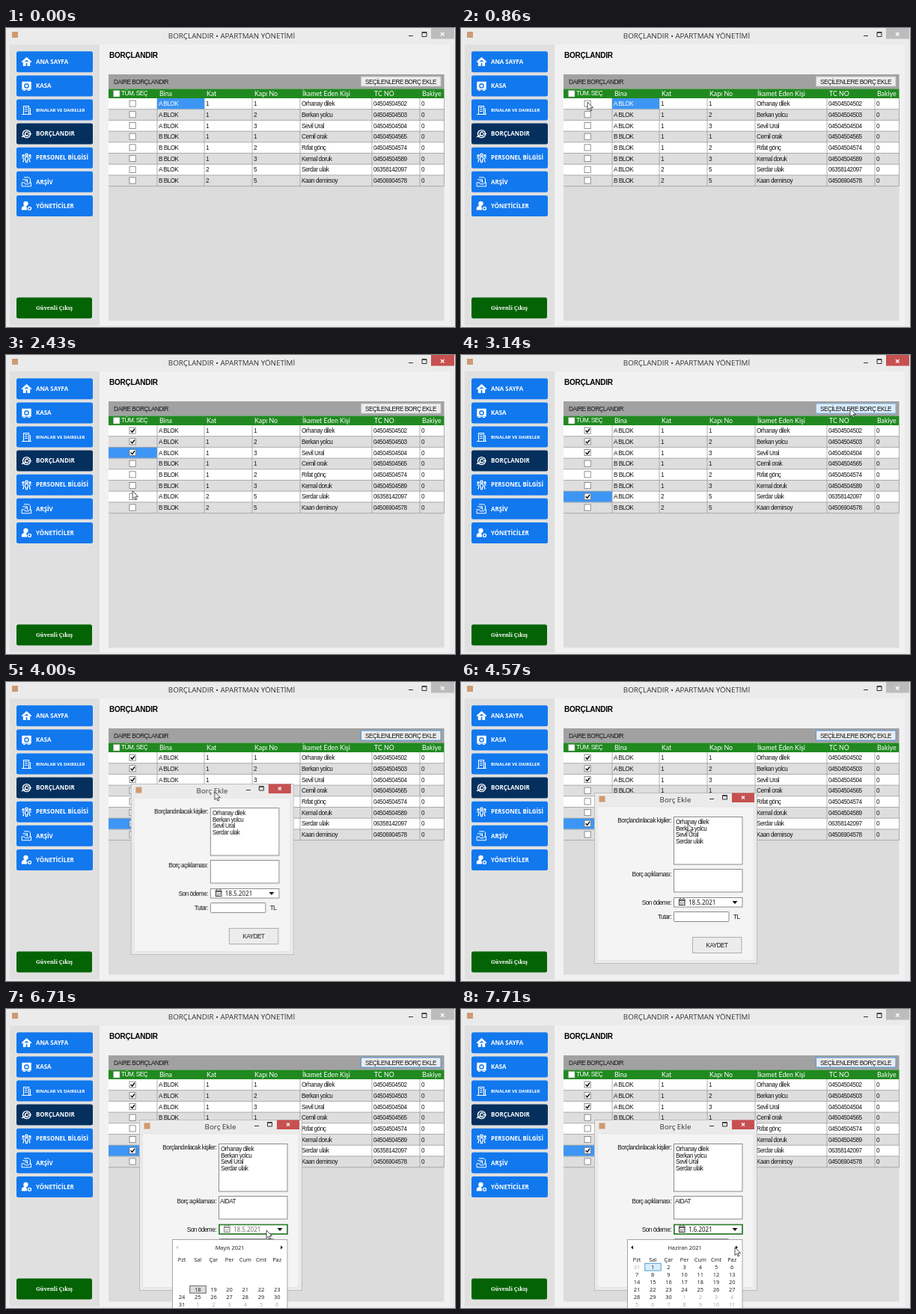
Animation, 600 px wide and 400 px high, one loop 8000 ms. Source, as an HTML page:

```html
<!DOCTYPE html>
<html lang="tr">
<head>
<meta charset="utf-8">
<title>Borçlandır</title>
<style>
html, body { margin: 0; width: 100%; height: 100%; overflow: hidden; background: #ebebeb; }
svg { display: block; width: 600px; height: 400px; }
text { font: 8.2px "Liberation Sans", Arial, sans-serif; letter-spacing: -.5px; fill: #161616; white-space: pre; }
.title { font: 9.8px "Open Sans", sans-serif; letter-spacing: 0; fill: #333; text-anchor: middle; }
.big { font-weight: bold; font-size: 10px; letter-spacing: -.25px; fill: #000; }
.head { font: 8.8px Lato, sans-serif; letter-spacing: 0; fill: #fff; }
.all { fill: #fff; }
.nav { font: bold 7.9px "Open Sans", sans-serif; letter-spacing: 0; fill: #fff; }
.small { font-size: 6px; }
.exit { font: bold 7.3px "Noto Serif", serif; letter-spacing: 0; fill: #fff; text-anchor: middle; }
.date { font: 8px "Noto Sans", sans-serif; letter-spacing: 0; }
.cal { font: 7.4px "Open Sans", sans-serif; letter-spacing: 0; text-anchor: middle; }
.mid { text-anchor: middle; }
.end { text-anchor: end; }
.dim { fill: #aaa; }
.icon { fill: none; stroke: #fff; stroke-width: 1.4; stroke-linejoin: round; stroke-linecap: round; }
.box { fill: #fff; stroke: #8b8b8b; }
.btn { fill: #ececec; stroke: #adadad; }

/* 1% of the loop = 80 ms */
.a { animation: 8s step-end infinite; }
.smooth { animation-timing-function: ease-in-out; }
.firstCell { animation-name: firstCell; }
.active { animation-name: active; }
.sel { animation-name: sel; }
.tick0 { animation-name: tick0; }
.tick1 { animation-name: tick1; }
.tick2 { animation-name: tick2; }
.tick6 { animation-name: tick6; }
.hover { animation-name: hover; }
.dialog { animation-name: drag; }
.key1 { animation-name: key1; }
.key2 { animation-name: key2; }
.key3 { animation-name: key3; }
.key4 { animation-name: key4; }
.key5 { animation-name: key5; }
.caret { animation-name: caret; }
.open { animation-name: open; }
.may { animation-name: may; }
.mayDate { animation-name: mayDate; }
.june { animation-name: june; }
.pointer { animation-name: pointer; }

@keyframes firstCell { 0% { visibility: visible } 12.4%, to { visibility: hidden } }
@keyframes active { 0% { fill: #bcbcbc } 12.4% { fill: #c75050 } 41.1%, to { fill: #bcbcbc } }
@keyframes sel {
  0% { visibility: hidden }
  12.4% { visibility: visible; transform: translateY(0) }
  22.3% { visibility: visible; transform: translateY(14.7px) }
  26.8% { visibility: visible; transform: translateY(29.4px) }
  32.1%, to { visibility: visible; transform: translateY(88.2px) }
}
@keyframes tick0 { 0% { visibility: hidden } 12.4%, to { visibility: visible } }
@keyframes tick1 { 0% { visibility: hidden } 22.3%, to { visibility: visible } }
@keyframes tick2 { 0% { visibility: hidden } 26.8%, to { visibility: visible } }
@keyframes tick6 { 0% { visibility: hidden } 32.1%, to { visibility: visible } }
@keyframes hover {
  0% { fill: #ececec; stroke: #c4c4c4 }
  37.5% { fill: #dcecfa; stroke: #7eb4ea }
  41.1%, to { fill: #ececec; stroke: #4a9be6 }
}
@keyframes drag {
  0%, 41.1% { opacity: 0; transform: translate(-14px, -15px) }
  42.8%, 48.4% { opacity: 1; transform: translate(-14px, -15px) }
  53.6%, to { opacity: 1; transform: none }
}
@keyframes key1 { 0% { visibility: hidden } 66.1%, to { visibility: visible } }
@keyframes key2 { 0% { visibility: hidden } 67.8%, to { visibility: visible } }
@keyframes key3 { 0% { visibility: hidden } 69.6%, to { visibility: visible } }
@keyframes key4 { 0% { visibility: hidden } 73.2%, to { visibility: visible } }
@keyframes key5 { 0% { visibility: hidden } 75%, to { visibility: visible } }
@keyframes caret {
  0% { visibility: hidden }
  60.7% { visibility: visible; transform: none }
  66.1% { visibility: visible; transform: translateX(5px) }
  67.8% { visibility: visible; transform: translateX(6.8px) }
  69.6% { visibility: visible; transform: translateX(12.2px) }
  73.2% { visibility: visible; transform: translateX(17.2px) }
  75% { visibility: visible; transform: translateX(21.7px) }
  82.1%, to { visibility: hidden }
}
@keyframes open { 0% { visibility: hidden } 82.1%, to { visibility: visible } }
@keyframes may { 0% { visibility: hidden } 82.1% { visibility: visible } 92.8%, to { visibility: hidden } }
@keyframes mayDate { 0% { opacity: 1 } 82.1% { opacity: .6 } 92.8%, to { opacity: 0 } }
@keyframes june { 0% { visibility: hidden } 92.8%, to { visibility: visible } }
@keyframes pointer {
  0%, 1.7% { opacity: 0; transform: translate(300px, 260px) }
  1.8% { opacity: 1; transform: translate(300px, 260px) }
  10.7%, 16% { opacity: 1; transform: translate(169px, 99px) }
  20.5%, 22.8% { opacity: 1; transform: translate(170px, 112px) }
  25.9%, 27.3% { opacity: 1; transform: translate(170px, 128px) }
  31.2%, 32.6% { opacity: 1; transform: translate(169px, 187px) }
  38.4%, 41.1% { opacity: 1; transform: translate(520px, 72px) }
  47%, 48.4% { opacity: 1; transform: translate(276px, 144px) }
  53.6%, 55% { opacity: 1; transform: translate(290px, 159px) }
  60.7%, 63% { opacity: 1; transform: translate(335px, 264px) }
  63.1%, 76% { opacity: 0; transform: translate(335px, 264px) }
  76.1% { opacity: 1; transform: translate(335px, 264px) }
  81%, 84% { opacity: 1; transform: translate(348px, 296px) }
  89%, to { opacity: 1; transform: translate(366px, 319px) }
}
</style>
</head>
<body>
<svg viewBox="0 0 600 400">
  <defs>
    <g id="calIcon">
      <rect x="291.5" y="291" width="7.5" height="7.5" fill="#fff" stroke="#333"/>
      <path d="M291 292.5h8.5M293 290v-1M297.5 290v-1M293 295.3h1M295 295.3h1M297 295.3h1M293 297h1M295 297h1" stroke="#333" stroke-width="1.2"/>
    </g>
  </defs>

  <!-- main window -->
  <rect width="600" height="400" fill="#ebebeb"/>
  <rect x="125" y="22" width="468" height="376" fill="#f1f1f1"/>
  <rect x="5" y="22" width="120" height="376" fill="#e0e0e0"/>
  <rect x="8" y="5" width="8" height="8" fill="#cf9a72"/>
  <text class="title" x="301.5" y="14">BORÇLANDIR • APARTMAN YÖNETİMİ</text>
  <rect class="a active" x="568" width="31" height="14.5"/>
  <path d="M538 10.5h6M556 5.5h6v6h-6zM556 6.3h6" fill="none" stroke="#333"/>
  <path d="M581 6l4.5 4.5M585.5 6l-4.5 4.5" stroke="#fff" stroke-width="1.3"/>

  <g id="nav"></g>
  <rect x="14" y="360.5" width="101" height="28" rx="2.5" fill="#046304"/>
  <text class="exit" x="64.5" y="377">Güvenli Çıkış</text>

  <!-- table -->
  <text class="big" x="138" y="40">BORÇLANDIR</text>
  <rect x="137" y="62" width="448.5" height="329.5" fill="#dcdcdc"/>
  <rect x="137" y="62" width="448.5" height="19.5" fill="#a1a1a1"/>
  <text x="144" y="74.7">DAIRE BORÇLANDIR</text>
  <rect class="a hover" x="474.5" y="65" width="106.5" height="13"/>
  <text class="mid" x="527.5" y="74.7">SEÇİLENLERE BORÇ EKLE</text>
  <rect x="137" y="81.5" width="448.5" height="12.5" fill="#208a20"/>
  <rect x="143.5" y="83.5" width="8.5" height="8.5" fill="#fff" stroke="#9a9a9a" stroke-width=".6"/>
  <g id="table"></g>

  <!-- dialog -->
  <g class="a smooth dialog">
    <rect x="178.5" y="148.5" width="217" height="228" fill="#ebebeb" stroke="#bdbdbd"/>
    <rect x="182.5" y="167" width="208.5" height="205.5" fill="#f4f4f4" stroke="#dedede" stroke-width=".6"/>
    <rect x="184.5" y="152.5" width="8" height="8" fill="#cf9a72"/>
    <text class="title" x="286.5" y="160.5">Borç Ekle</text>
    <rect x="362" y="148.5" width="30" height="12.5" fill="#c75050"/>
    <path d="M375 152.5l4 4M379 152.5l-4 4" stroke="#fff" stroke-width="1.2"/>
    <path d="M332 156.5h6M349.5 151.5h6v5.5h-6zM349.5 152.3h6" fill="none" stroke="#333"/>
    <text class="end" x="281" y="187.5">Borçlandırılacak kişiler:</text>
    <text class="end" x="281" y="260">Borç açıklaması:</text>
    <text class="end" x="281" y="297.5">Son ödeme:</text>
    <text class="end" x="281" y="317">Tutar:</text>
    <rect class="box" x="284.5" y="180.5" width="91.5" height="63.5"/>
    <g id="people"></g>
    <rect class="box" x="284.5" y="250.5" width="91.5" height="30.5"/>
    <text x="286" y="259.5"><tspan class="a key1">A</tspan><tspan class="a key2">I</tspan><tspan class="a key3">D</tspan><tspan class="a key4">A</tspan><tspan class="a key5">T</tspan></text>
    <path class="a caret" d="M286.5 252v9" stroke="#000" stroke-width=".8"/>
    <rect class="box" x="284.5" y="288.5" width="91.5" height="12.5"/>
    <rect class="a open" x="285" y="288.5" width="91" height="12.5" fill="none" stroke="#2b7d2b" stroke-width="1.6"/>
    <g class="a mayDate"><use href="#calIcon"/><text class="date" x="304" y="297.8">18.5.2021</text></g>
    <g class="a june"><use href="#calIcon"/><text class="date" x="304" y="297.8">1.6.2021</text></g>
    <path d="M362.5 293h7l-3.5 4z" fill="#111"/>
    <rect class="box" x="284.5" y="307.5" width="73.5" height="13" rx="1"/>
    <text x="364" y="317">TL</text>
    <rect class="btn" x="309.5" y="341.5" width="65.5" height="21"/>
    <text class="mid" x="342" y="355">KAYDET</text>
  </g>

  <!-- calendar -->
  <g class="a open">
    <rect x="222.5" y="308.5" width="153.5" height="96" fill="#fff" stroke="#a5a5a5"/>
    <path d="M367 316.5v5l3-2.5z" fill="#111"/>
    <g id="days"></g>
  </g>
  <g id="may" class="a may"><path d="M230 316.5v5l-3-2.5z" fill="#ccc"/></g>
  <g id="june" class="a june"><path d="M230 316.5v5l-3-2.5z" fill="#111"/></g>

  <path class="a smooth pointer" d="M0 0v10.5l2.5-2.3 1.7 3.8 1.6-.7-1.7-3.7h3.4z" fill="#fff" stroke="#222" stroke-width=".8"/>
</svg>
<script>
const put = (id, html) => document.getElementById(id).insertAdjacentHTML('beforeend', html);
const text = (x, y, s, cls = '') => `<text x="${x}" y="${y}" class="${cls}">${s}</text>`;
const rect = (x, y, w, h, attrs) => `<rect x="${x}" y="${y}" width="${w}" height="${h}" ${attrs}/>`;

// Sidebar: label and icon path around 0,0
const menu = [
  ['ANA SAYFA', '<path d="M-6 0L0-5.5 6 0M-4 0v5h2.5v-4h3v4H4V0L0-3.5z" fill="#fff"/>'],
  ['KASA', '<path d="M-5.5-5h11v9.5h-11z" fill="#fff"/><circle r="2.6" stroke="#1278ee"/><path d="M-4 6h2M2 6h2"/>'],
  ['BINALAR VE DAIRELER', '<path d="M-4 6V-5h7V6zM5-2v8M-6 6H6M-2-3h3M-2-.5h3M-2 2h3" stroke-width="1.1"/>'],
  ['BORÇLANDIR', '<circle r="5"/><path d="M2-2a2.5 2.5 0 1 0 0 4M-6 4l4-2M2 0h4"/>'],
  ['PERSONEL BİLGİSİ', '<circle cy="-4" r="1.6"/><circle cx="-4.5" cy="-3" r="1"/><circle cx="4.5" cy="-3" r="1"/><path d="M-2-1h4v4H1v3h-2V3h-1zM-6 0h2v5h-1M6 0H4v5h1" stroke-width="1.1"/>'],
  ['ARŞİV', '<path d="M-3-6h6l2 2v5M-5-3h6v4M-6 1h3l1 2h5l1-2h2v5H-6zM-2-1h3" stroke-width="1"/>'],
  ['YÖNETİCİLER', '<circle cx="-1" cy="-3" r="2.5" fill="#fff"/><path d="M-6 5V3q1-3 5-2.5L0 5z" fill="#fff"/><circle cx="4" cy="3.5" r="2" stroke-dasharray="1.3 .7"/>']
];
menu.forEach(([label, icon], i) => {
  const y = 45.3 + i * 32.1;
  put('nav', rect(14, y - 14, 102, 28, `rx="2.5" fill="${i === 3 ? '#05305e' : '#1278ee'}"`) +
    `<g class="icon" transform="translate(27.5 ${y})">${icon}</g>` +
    text(40, y + 2.7, label, label.length > 16 ? 'nav small' : 'nav'));
});

// Table
const rowH = 14.7, top0 = 94;
const cols = [202, 265, 329, 393, 489, 553];
const rows = [
  ['A', 1, 1, 'Orhanay dilek', '04504504502'],
  ['A', 1, 2, 'Berkan yolcu', '04504504503'],
  ['A', 1, 3, 'Sevil Ural', '04504504504'],
  ['B', 1, 1, 'Cemil orak', '04504504565'],
  ['B', 1, 2, 'Rıfat gönç', '04504504574'],
  ['B', 1, 3, 'Kemal doruk', '04504504589'],
  ['A', 2, 5, 'Serdar ulak', '06358142097'],
  ['B', 2, 5, 'Kaan demirsoy', '04506904578']
];
const chosen = [0, 1, 2, 6];
put('table', text(154, 90.3, 'TÜM. SEÇ', 'all') +
  ['Bina', 'Kat', 'Kapı No', 'İkamet Eden Kişi', 'TC NO', 'Bakiye']
    .map((s, i) => text(cols[i] + 3, 90.5, s, 'head')).join(''));
rows.forEach((r, i) => put('table',
  rect(137, top0 + i * rowH, 448.5, rowH, `fill="${i % 2 ? '#dedede' : '#fff'}"`)));
put('table', rect(137, top0, 65, rowH, 'class="a sel" fill="#3d96f5"'));
let grid = '';
for (let i = 1; i <= 8; i++) grid += `M137 ${top0 + i * rowH}h448.5`;
for (const x of [...cols, 585.5]) grid += `M${x} 94v${8 * rowH}`;
put('table', `<path d="${grid}" stroke="#9c9c9c" stroke-width=".8"/>`);
rows.forEach(([block, ...rest], i) => {
  const y = top0 + i * rowH, cells = [block + ' BLOK', ...rest, 0];
  put('table', cells.map((s, k) => text(cols[k] + 2, y + 10.2, s)).join('') +
    rect(165, y + 3, 8.2, 8.2, 'fill="#fff" stroke="#777" stroke-width=".8"'));
  if (chosen.includes(i)) put('table',
    `<path class="a tick${i}" d="M166.7 ${y + 7}l2 2.2 3.2-4.4" fill="none" stroke="#111" stroke-width="1.5"/>`);
});
put('table', `<g class="a firstCell">${rect(202, top0, 63, rowH - .4, 'fill="#3d96f5"')}${text(204, top0 + 10.2, 'A BLOK', 'all')}</g>`);
chosen.forEach((r, i) => put('people', text(287, 190 + i * 8.6, rows[r][3])));

// Calendar
const dayX = i => 235 + i * 21.2;
put('days', ['Pzt', 'Sal', 'Çar', 'Per', 'Cum', 'Cmt', 'Paz']
  .map((s, i) => text(dayX(i), 337.5, s, 'cal')).join(''));
function month(id, title, index, picked, style) {
  const lead = (new Date(2021, index, 1).getDay() + 6) % 7;
  const firstAllowed = new Date(2021, 4, 18);
  let html = text(299, 321.8, title, 'cal');
  for (let i = 0; i < 42; i++) {
    const day = new Date(2021, index, 1 - lead + i), inside = day.getMonth() === index;
    if (day < firstAllowed) continue;
    const x = dayX(i % 7), y = 348 + Math.floor(i / 7) * 10;
    if (inside && day.getDate() === picked) html += rect(x - 10.5, y - 7.7, 21.5, 9.8, style);
    html += text(x, y, day.getDate(), inside ? 'cal' : 'cal dim');
  }
  put(id, html);
}
month('may', 'Mayıs 2021', 4, 18, 'fill="#dcdcdc" stroke="#666"');
month('june', 'Haziran 2021', 5, 1, 'fill="#d9ecfb" stroke="#5a9fd0"');
</script>
</body>
</html>
```
